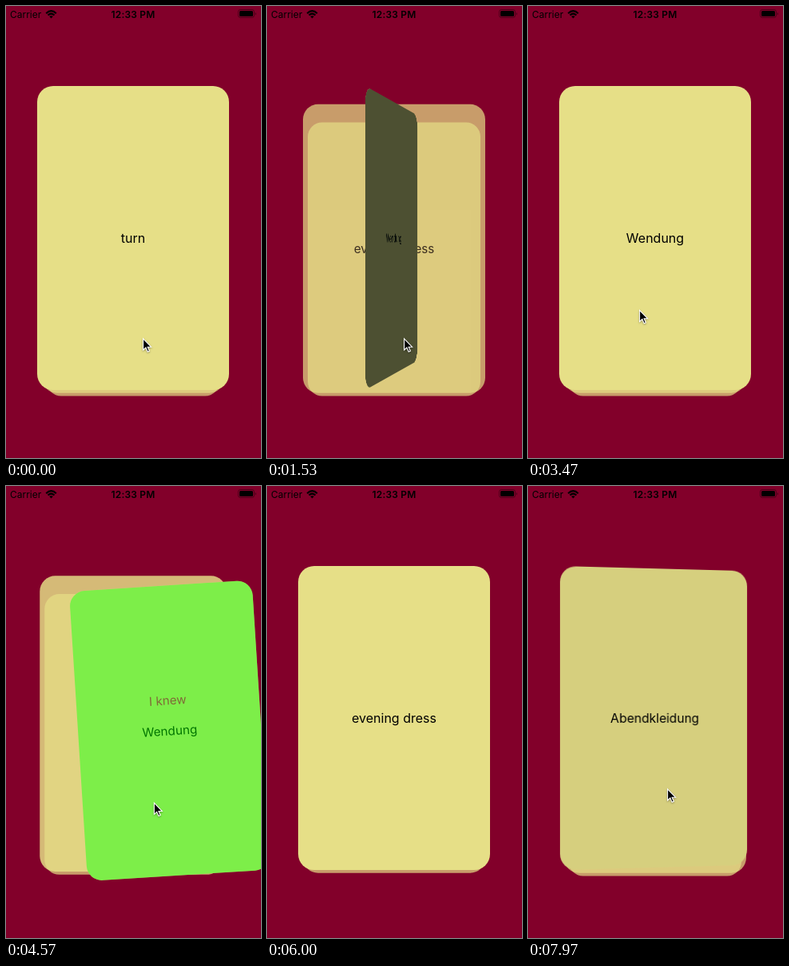
Animation of 319 by 565 pixels, one loop 8000 ms. Source, as an HTML page:

```html
<!DOCTYPE html>
<html lang="en">
<head>
<meta charset="utf-8">
<title>Vocabulary cards</title>
<style>
  html, body { margin: 0; width: 100%; height: 100%; overflow: hidden; }
  body { position: relative; background: #82002a; color: #000; font-family: Inter, Roboto, sans-serif; }
  .card, .shade {
    position: absolute; border-radius: 20px;
    display: flex; align-items: center; justify-content: center;
  }
  .card { left: 39px; top: 100px; width: 240px; height: 380px; background: #e6df87; font-size: 16px; }
  .shade { inset: 0; opacity: 0; background: #000808; }
  .label { position: absolute; left: 0; right: 0; top: 140px; text-align: center; line-height: 20px; color: #82002a; opacity: 0; }
  .status { position: absolute; top: 3px; font-size: 12px; line-height: 15px; white-space: pre; }
  #time { left: 0; width: 318px; text-align: center; font-weight: 600; letter-spacing: .2px; }
  svg { position: absolute; left: 0; top: 0; overflow: visible; }
</style>
</head>
<body>
<div id="deck"></div>
<div class="status" style="left:5px">Carrier</div>
<div class="status" id="time">12:33 PM</div>
<svg width="319" height="20">
  <g fill="none" stroke="#000" stroke-width="2.1">
    <path d="M50.2 9.2Q56.5 3.2 62.8 9.2M52.5 11.6Q56.5 7.8 60.5 11.6"/>
  </g>
  <path d="M54.2 13.1Q56.5 11.2 58.8 13.1L56.5 15.5Z"/>
  <rect x="290.5" y="4.5" width="20" height="10" rx="2.8" fill="none" stroke="#000" stroke-opacity=".4"/>
  <rect x="292" y="6" width="17" height="7" rx="1.5"/>
  <path d="M311.8 8v3.4q1.2-.5 1.2-1.7t-1.2-1.7" fill-opacity=".45"/>
</svg>
<svg id="cursor" width="12" height="18">
  <path d="M.6.8V15L3.9 12 6.2 17.2 8.4 16.2 6.2 11.2H10.6Z" stroke="#fff" stroke-width="1.1"
    style="filter:drop-shadow(0 1px 1px #0005)"/>
</svg>
<script>
const LOOP = 8000, FLIP_MS = 1000;
const deck = document.getElementById('deck');
const cursor = document.getElementById('cursor');
const clamp = v => Math.min(1, Math.max(0, v));

function makeCard(front = '', back = '', flipAt = Infinity) {
  const el = document.createElement('div');
  el.className = 'card';
  el.innerHTML = '<span></span><div class="shade"></div><div class="label">I knew</div>';
  deck.prepend(el);
  const [text, shade, label] = el.children;
  return { el, text, shade, label, front, back, flipAt };
}

const first = makeCard('turn', 'Wendung', 970);
const second = makeCard('evening dress', 'Abendkleidung', 7090);
const third = makeCard();
const fourth = makeCard();

// Each key is [time, x, y].
const drag = [[3970, 0, 0], [4250, 15, 4], [4570, 45.7, 15.8], [5100, 73, 28],
  [5600, 100, 41], [5750, 165, 47], [5970, 370, 58]];
const approach = [[2730, 171, 415], [2950, 164, 407], [3250, 145, 386], [3470, 139, 379.5]];
const comeBack = [[6100, 330, 405], [6250, 235, 390], [6400, 178, 380], [6530, 174, 378]];

function track(keys, t) {
  let i = 1;
  while (i < keys.length - 1 && t > keys[i][0]) i++;
  const [a, b] = [keys[i - 1], keys[i]];
  const k = clamp((t - a[0]) / (b[0] - a[0]));
  return [a[1] + (b[1] - a[1]) * k, a[2] + (b[2] - a[2]) * k];
}

// cubic-bezier(.42, 0, 1, 1)
function easeIn(x) {
  let lo = 0, hi = 1;
  for (let i = 0; i < 24; i++) {
    const s = (lo + hi) / 2;
    const px = 1.26 * s * (1 - s) ** 2 + 3 * (1 - s) * s * s + s ** 3;
    if (px < x) lo = s; else hi = s;
  }
  return 3 * lo * lo - 2 * lo ** 3;
}
const easeInOut = x => x < .5 ? easeIn(2 * x) / 2 : 1 - easeIn(2 - 2 * x) / 2;

function stack(card, depth, alpha = 1) {
  card.el.style.opacity = alpha * (1 - .3 * clamp(depth));
  card.el.style.transform = `translateY(${13.25 * depth}px) scale(${1 - .05 * depth})`;
}

// The near edge stays in the screen plane while the card turns.
function flip(card, t) {
  const turn = 180 * easeInOut(clamp((t - card.flipAt) / FLIP_MS));
  const turned = turn > 90;
  const angle = turned ? 180 - turn : -turn;
  const text = turned ? card.back : card.front;
  if (card.text.textContent !== text) card.text.textContent = text;
  card.shade.style.background = '#000808';
  card.shade.style.opacity = .82 * Math.abs(angle) / 90;
  if (turn > 0 && turn < 180) {
    const back = 120 * Math.sin(turn * Math.PI / 180);
    card.el.style.transform = `perspective(960px) translateZ(${-back}px) rotateY(${angle}deg)`;
  }
}

function swipe(card, dx, dy, progress) {
  card.label.style.opacity = progress * 1.2;
  if (!dx) return;
  card.shade.style.background = '#0f0';
  card.shade.style.opacity = progress;
  card.el.style.transform =
    `translate(${dx}px, ${dy}px) rotate(${-.08 * dx}deg) scale(${1 - .1 * progress})`;
}

function moveCursor(t, dx, dy) {
  let [x, y] = track(approach, t);
  if (t > 6050) [x, y] = track(comeBack, t);
  else { x += dx; y += dy; }
  cursor.style.transform = `translate(${x}px, ${y}px)`;
}

function draw(t) {
  const [dx, dy] = track(drag, t);
  const progress = clamp(dx / 100);
  stack(first, 0);
  stack(second, 1 - progress);
  stack(third, 2 - progress);
  stack(fourth, 2, clamp((t - 6010) / 250));
  flip(first, t);
  flip(second, t);
  swipe(first, dx, dy, progress);
  moveCursor(t, dx, dy);
}

const start = performance.now();
function frame() {
  draw((performance.now() - start) % LOOP);
  requestAnimationFrame(frame);
}
frame();
</script>
</body>
</html>
```
